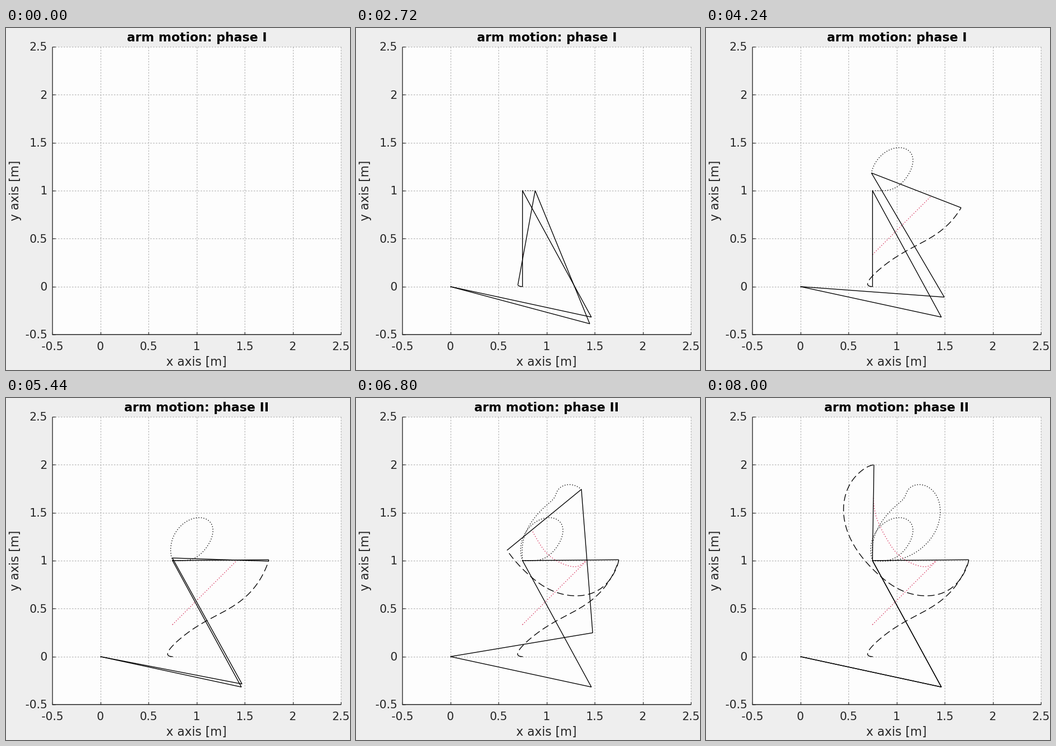
A matplotlib script that plays this animation: 640 by 637 pixels, repeating every 9200 ms.

```python
import numpy as np
import matplotlib
import matplotlib.pyplot as plt
from matplotlib.animation import FuncAnimation

W, H, DPI = 640, 637, 100
STEP_MS, FRAMES = 80, 115
START_1, START_2 = 24, 68      # first frame of each phase
LINK, TIP = 1.5, 1.0           # lengths of the two long links and the last one
PT = 72 / DPI                  # one pixel in points

plt.rcParams["font.family"] = "DejaVu Sans"
plt.rcParams["lines.scale_dashes"] = False


def to_px(x, y):
    return 86 + (np.asarray(x) + 0.5) * 179, 571 - (np.asarray(y) + 0.5) * 178.67


# Phase I: the point at 2/3 of the last link runs along a straight line and
# gravity plus its acceleration set the direction of the link.
SPAN, GRAV = 2 / 3, 9.81
RATIO = GRAV / SPAN
RISE = np.polynomial.Polynomial([0, 0, 0, 0, 35, -84, 70, -20])
BRAKE = np.polynomial.Polynomial([0, 0, 0, 0, 2.5, -7, 6.5, -2])
PATH = RISE - RATIO * BRAKE


def phase_one(n):
    tau = np.clip(0.005 + 0.0305 * n, 0, 1) * (n > 0)
    s = SPAN * PATH(tau)
    acc = PATH.deriv(2)(tau) / RATIO
    return 0.75 + s, 1 / 3 + s, np.arctan2(-(acc + 1), -acc)


# Phase II: keys of the same point and of the link angle, per step.
KEY_N = np.array([0, 1, 3, 6, 9, 12, 16, 20, 23, 26, 29, 33])
KEY_X = [1.4167, 1.415, 1.392, 1.310, 1.175, 1.038, 0.908, 0.798, 0.768,
         0.762, 0.760, 0.760]
KEY_Y = [1.0067, 1.006, 0.985, 0.938, 0.965, 1.0447, 1.21, 1.43, 1.5523,
         1.612, 1.648, 1.667]
KEY_A = [0.5, -1.9, -16, -48.5, -79, -95.6, -119, -168, -210.8, -240, -258, -270.9]


def spline_slopes(keys):
    """Slopes of the cubic spline that is at rest at both ends."""
    gap = 1 / np.diff(KEY_N)
    pull = 3 * np.diff(keys) * gap ** 2
    m, rhs = np.eye(len(keys)), np.zeros(len(keys))
    for i in range(1, len(keys) - 1):
        m[i, i - 1:i + 2] = gap[i - 1], 2 * (gap[i - 1] + gap[i]), gap[i]
        rhs[i] = pull[i - 1] + pull[i]
    return np.linalg.solve(m, rhs)


def smooth(keys, n):
    keys = np.asarray(keys)
    slope = spline_slopes(keys)
    k = np.clip(np.searchsorted(KEY_N, n, side="right") - 1, 0, len(KEY_N) - 2)
    width = KEY_N[k + 1] - KEY_N[k]
    u = (n - KEY_N[k]) / width
    return ((1 + 2 * u) * (1 - u) ** 2 * keys[k] + u * (1 - u) ** 2 * width * slope[k]
            + u * u * (3 - 2 * u) * keys[k + 1] - u * u * (1 - u) * width * slope[k + 1])


def phase_two(n):
    n = np.clip(n, 0, 33)
    return smooth(KEY_X, n), smooth(KEY_Y, n), np.radians(smooth(KEY_A, n))


def points(phase, n):
    """Wrist, tip and the point between them at step n."""
    x, y, a = phase(np.asarray(n, float))
    c, s = TIP * np.cos(a), TIP * np.sin(a)
    return (x - c * 2 / 3, y - s * 2 / 3), (x + c / 3, y + s / 3), (x, y)


def arm(phase, n):
    (wx, wy), (tx, ty), _ = points(phase, n)
    r = np.hypot(wx, wy)
    h = np.sqrt(LINK ** 2 - r * r / 4)
    ex, ey = wx / 2 + h * wy / r, wy / 2 - h * wx / r
    return to_px([0, ex, wx, tx], [0, ey, wy, ty])


fig = plt.figure(figsize=(W / DPI, H / DPI), dpi=DPI, facecolor="#eeeeee")
ax = fig.add_axes([0, 0, 1, 1])
ax.set_xlim(0, W)
ax.set_ylim(H, 0)
ax.axis("off")


def line(xs=(), ys=(), color="black", width=1.1, dash=None, z=3, **kw):
    style = (0, [d * PT for d in dash]) if dash else "-"
    item, = ax.plot(xs, ys, color=color, lw=width * PT, ls=style, zorder=z,
                    dash_capstyle="butt", solid_capstyle="butt",
                    solid_joinstyle="bevel", **kw)
    return item


def label(x, y, text, size, ha="center", **kw):
    return ax.text(x, y, text, fontsize=size * PT, ha=ha, va="baseline", **kw)


def draw_axes():
    ax.add_patch(plt.Rectangle((86, 35), 537, 536, color="#fdfdfd", lw=0, zorder=0))
    for k in range(7):
        v = -0.5 + 0.5 * k
        px, py = to_px(v, v)
        if k:
            line([px, px], [35, 571], "#b0b0b0", 1.2, (2.6, 2.6), 1)
            line([86, 623], [py, py], "#b0b0b0", 1.2, (2.6, 2.6), 1)
        line([px, px], [571, 565.5], "#262626", 1.2, z=2)
        line([86, 91.5], [py, py], "#262626", 1.2, z=2)
        label(px, 599.5, f"{v:g}", 21, color="#262626")
        label(77, py + 7.5, f"{v:g}", 21, "right", color="#262626")
    line([86, 86], [35, 571], "#262626", 1.4, z=2)
    line([86, 623], [571, 571], "#262626", 1.6, z=2, snap=False)
    label(354.5, 629.5, "x axis [m]", 22.6, color="#262626")
    label(24, 302.5, "y axis [m]", 22.6, color="#262626",
          rotation=90, rotation_mode="anchor")


draw_axes()
title = label(355, 24.5, "", 23, weight="bold", color="black")


def trace_set():
    return (line(width=1.4, dash=(1.5, 3.2)),
            line(width=1.4, dash=(13, 6.5)),
            line(color="#d42a55", width=1.4, dash=(1.5, 3.2)))


traces = {phase_one: trace_set(), phase_two: trace_set()}
rest_arm = line(width=1.4)
live_arm = line(width=1.4)


def set_traces(phase, n):
    steps = np.linspace(0, n, 240) if n > 0 else np.array([])
    for item, (x, y) in zip(traces[phase], points(phase, steps)):
        item.set_data(*to_px(x, y))


def update(i):
    second = i >= START_2
    title.set_text("arm motion: phase " + ("II" if second else "I"))
    set_traces(phase_one, min(i - START_1, 33))
    set_traces(phase_two, min(i - START_2 + 1, 33) if second else 0)
    if i < START_1:
        rest_arm.set_data([], [])
        live_arm.set_data([], [])
        return
    phase = phase_two if second else phase_one
    n = min(i - START_2 + 1, 33) if second else i - START_1
    rest_arm.set_data(*arm(phase, 0))
    live_arm.set_data(*arm(phase, n))


anim = FuncAnimation(fig, update, frames=FRAMES, interval=STEP_MS,
                     init_func=lambda: update(0), repeat=True, repeat_delay=0)
plt.show()
```
